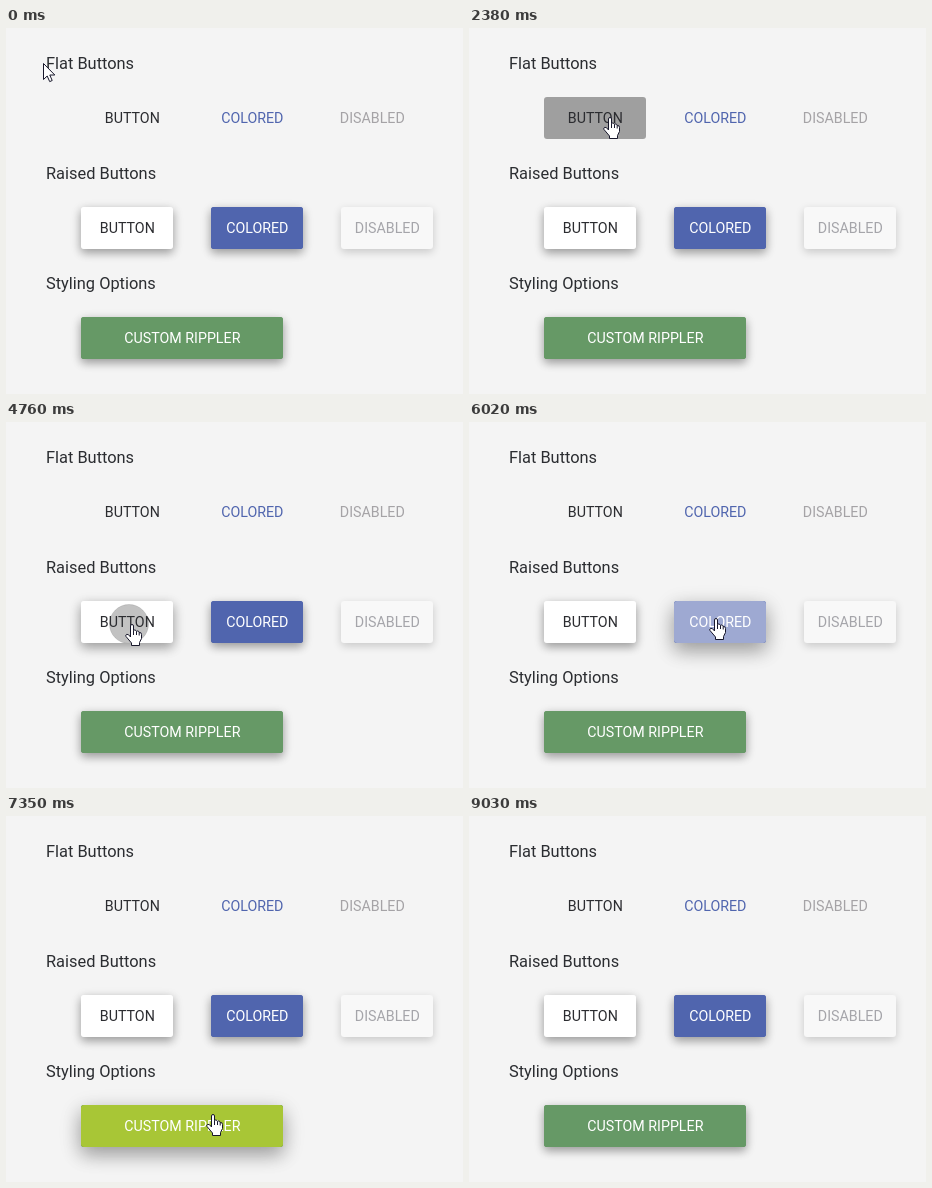
An HTML page with a canvas for the animation above (9.38 s loop, 457 by 366 pixels).

```html
<!DOCTYPE html>
<html lang="en">
<head>
<meta charset="utf-8">
<title>Ripple buttons</title>
<style>
  html, body { margin: 0; width: 100%; height: 100%; overflow: hidden; background: #f4f4f4; }
  canvas { display: block; }
</style>
</head>
<body>
<canvas id="stage" width="457" height="366"></canvas>
<script>
const ctx = document.getElementById('stage').getContext('2d');
const LOOP = 9380, STEP = 70;
const FONT = 'Roboto, "Open Sans", sans-serif';
const BLUE = '#5065ae';

const headings = [['Flat Buttons', 41], ['Raised Buttons', 151], ['Styling Options', 261]];

const buttons = {
  flat:        { x: 75,  y: 69,  w: 102, label: 'BUTTON',   color: '#2b2c30', ink: '0,0,0', alpha: .35 },
  flatBlue:    { x: 195, y: 69,  w: 102, label: 'COLORED',  color: BLUE, ink: '80,101,174', alpha: .36 },
  flatOff:     { x: 315, y: 69,  w: 102, label: 'DISABLED', color: '#a5a3a6', off: true },
  raised:      { x: 75,  y: 179, w: 92,  label: 'BUTTON',   color: '#2b2c30', fill: '#fff', ink: '0,0,0', alpha: .35 },
  raisedBlue:  { x: 205, y: 179, w: 92,  label: 'COLORED',  color: '#fff', fill: BLUE, ink: '255,255,255', alpha: .45 },
  raisedOff:   { x: 335, y: 179, w: 92,  label: 'DISABLED', color: '#a5a5aa', fill: '#f8f8f8', off: true },
  custom:      { x: 75,  y: 289, w: 202, label: 'CUSTOM RIPPLER', color: '#fff', fill: '#669966', ink: '169,199,54', alpha: 1 }
};
const HEIGHT = 42;

// Press, release and fade times in ms
const presses = [
  { on: 'flat',       x: 140, y: 89,  start: 1290, release: 1620, fade: 380 },
  { on: 'flat',       x: 140, y: 89,  start: 2060, release: 2560, fade: 400 },
  { on: 'flatBlue',   x: 261, y: 96,  start: 3430, release: 3715, fade: 400 },
  { on: 'raised',     x: 123, y: 202, start: 4630, release: 4920, fade: 400 },
  { on: 'raisedBlue', x: 246, y: 197, start: 5570, release: 5990, fade: 420 },
  { on: 'custom',     x: 206, y: 299, start: 6950, release: 7310, fade: 660 }
];
const GROW = 290;

// Pointer travel: begin, end, points passed on the way
const moves = [
  [300, 1050, [[37, 35], [32, 39], [78, 66], [140, 89]]],
  [2730, 3360, [[140, 89], [200, 88], [261, 94]]],
  [3715, 4620, [[261, 94], [334, 100], [365, 134], [300, 185], [200, 201], [125, 202]]],
  [4900, 5530, [[125, 202], [72, 214], [104, 234], [185, 230], [246, 196]]],
  [6230, 6930, [[246, 196], [236, 245], [206, 298]]],
  [8270, 9030, [[206, 298], [300, 318], [384, 342], [436, 372]]]
];

const clamp = v => Math.max(0, Math.min(1, v));
const smooth = v => { v = clamp(v); return v * v * (3 - 2 * v); };
const mix = (a, b, k) => a + (b - a) * k;

function spline(points, k) {
  const n = points.length - 1;
  const i = Math.min(n - 1, Math.floor(k * n)), u = k * n - i;
  const at = j => points[Math.max(0, Math.min(n, j))];
  return [0, 1].map(d => {
    const [a, b, c, e] = [at(i - 1)[d], at(i)[d], at(i + 1)[d], at(i + 2)[d]];
    return b + u / 2 * (c - a + u * (2 * a - 5 * b + 4 * c - e + u * (3 * (b - c) + e - a)));
  });
}

function pointerAt(t) {
  let move = moves[0];
  for (const m of moves) if (t >= m[0]) move = m;
  const [from, to, points] = move;
  const k = clamp((t - from) / (to - from));
  return spline(points, mix(k, smooth(k), .5)).map(Math.round);
}

function box(b) {
  ctx.beginPath();
  ctx.roundRect(b.x, b.y, b.w, HEIGHT, 3);
}

function shadow(b, dy, blur, alpha) {
  ctx.save();
  ctx.shadowColor = `rgba(0,0,0,${alpha})`;
  ctx.shadowOffsetY = dy;
  ctx.shadowBlur = blur;
  ctx.fillStyle = b.fill;
  box(b);
  ctx.fill();
  ctx.restore();
}

function drawRipple(b, p, t) {
  const grown = Math.pow(clamp((t - p.start) / GROW), 1.25);
  const faded = 1 - smooth((t - p.release) / p.fade);
  if (grown <= 0 || faded <= 0) return;
  const far = Math.hypot(Math.max(p.x - b.x, b.x + b.w - p.x),
                         Math.max(p.y - b.y, b.y + HEIGHT - p.y));
  const alpha = b.alpha * faded * (b.alpha === 1 ? 1 : mix(.5, 1, grown));
  ctx.save();
  box(b);
  ctx.clip();
  ctx.beginPath();
  ctx.arc(p.x, p.y, far * grown + (grown === 1 ? 2 : 0), 0, 7);
  ctx.fillStyle = `rgba(${b.ink},${alpha})`;
  ctx.fill();
  if (grown < 1) {
    ctx.strokeStyle = `rgba(${b.ink},${alpha * .5})`;
    ctx.stroke();
  }
  ctx.restore();
}

function drawButton(name, t) {
  const b = buttons[name];
  const own = presses.filter(p => p.on === name);
  if (b.fill) {
    if (b.off) {
      shadow(b, 3, 9, .18);
    } else {
      const lift = Math.max(...own.map(p =>
        smooth((t - p.start - 60) / 300) * (1 - smooth((t - p.release - 40) / 350))));
      shadow(b, mix(3, 6, lift), mix(11, 22, lift), mix(.2, .2, lift));
      shadow(b, mix(4, 8, lift), mix(9, 18, lift), mix(.22, .22, lift));
    }
  }
  own.forEach(p => drawRipple(b, p, t));
  ctx.font = '400 14.25px ' + FONT;
  ctx.textAlign = 'center';
  ctx.fillStyle = b.color;
  ctx.fillText(b.label, b.x + b.w / 2 + .3, b.y + 26);
}

const arrow = new Path2D('M.5 .5V16.5L4.2 13L6.7 18.6L9.2 17.5L6.8 12H11.8Z');
const hand = new Path2D('M5.5 13V2Q5.5 .5 7 .5T8.5 2V6.6Q9 5.9 10 6T11.5 7.5' +
  'Q12 6.8 13 7T14.2 8.6Q16.5 8 16.5 10.4V14.5L14.5 18.5V21.5H6.5V19L1 12.5' +
  'Q.2 10.8 1.8 10.3T5.5 13Z');
const fingers = new Path2D('M8.5 6.5V11M11.5 7.5V11M14.2 8.5V11.5');

function drawPointer(x, y) {
  const over = Object.values(buttons).some(b =>
    !b.off && x >= b.x && x < b.x + b.w && y >= b.y && y < b.y + HEIGHT);
  ctx.save();
  ctx.translate(over ? x - 6 : x, y);
  ctx.fillStyle = '#fff';
  ctx.strokeStyle = '#17172b';
  ctx.lineWidth = 1;
  ctx.lineJoin = 'round';
  const shape = over ? hand : arrow;
  ctx.fill(shape);
  ctx.stroke(shape);
  if (over) ctx.stroke(fingers);
  ctx.restore();
}

function draw(t) {
  ctx.fillStyle = '#f4f4f4';
  ctx.fillRect(0, 0, 457, 366);
  ctx.font = '400 16.4px ' + FONT;
  ctx.textAlign = 'left';
  ctx.fillStyle = '#2b2d31';
  for (const [text, y] of headings) ctx.fillText(text, 40, y);
  for (const name in buttons) drawButton(name, t);
  drawPointer(...pointerAt(t));
}

const begin = performance.now();
function tick() {
  const t = (performance.now() - begin) % LOOP;
  draw(Math.floor(t / STEP) * STEP);
  requestAnimationFrame(tick);
}
tick();
</script>
</body>
</html>
```
